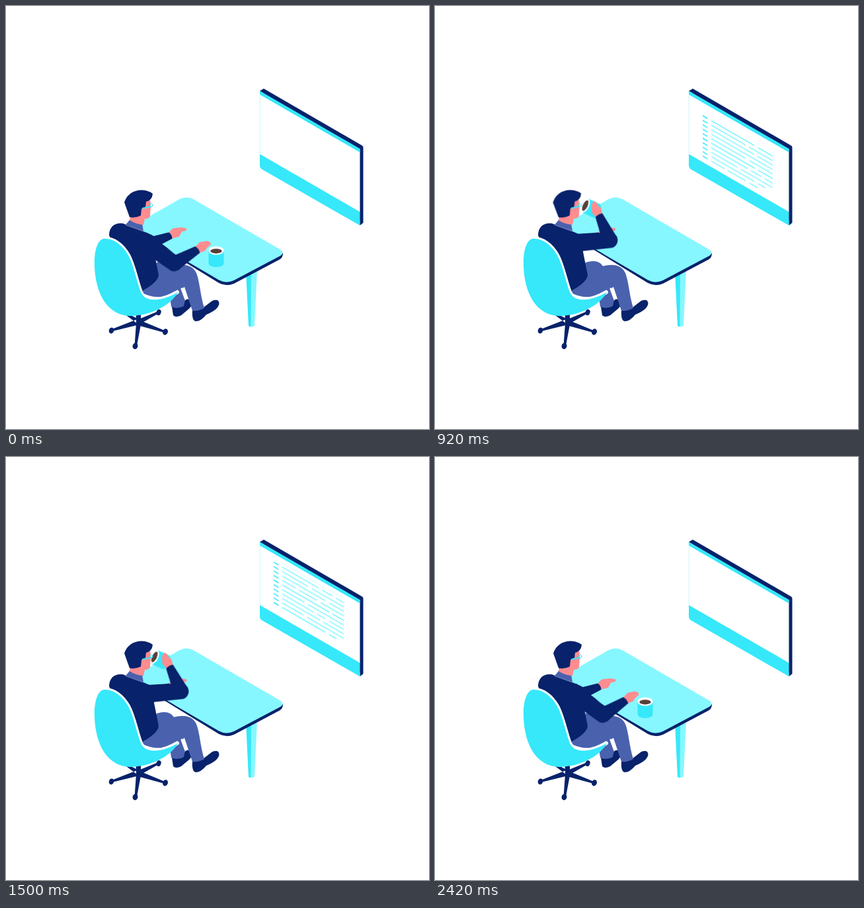
Animation, 640 px wide and 640 px high, one loop 2.71 s. Source, as an HTML page without scripts:

```html
<!DOCTYPE html>
<html lang="en">
<head>
<meta charset="utf-8">
<title>Coffee at the desk</title>
<style>
  html, body { margin: 0; width: 100%; height: 100%; overflow: hidden; background: #fff; }
  svg { display: block; width: 100%; height: 100%; }

  .navy { fill: #08226b; }
  .cyan { fill: #36e8fa; }
  .light { fill: #86f7ff; }
  .blue { fill: #4a62ae; }
  .skin { fill: #ff8c8f; }
  .white { fill: #fff; }
  .coffee { fill: #57403a; }
  .line { fill: none; stroke-linecap: round; stroke-linejoin: round; }

  .rows, .upper, .fore, .grip, .held, .resting, .head { animation: 2710ms linear infinite; }
  .rows { animation-name: scroll; }
  .upper { animation-name: upper; }
  .fore { animation-name: fore; }
  .grip { animation-name: grip; }
  .held { animation-name: held; }
  .resting { animation-name: resting; }
  .head { animation-name: nod; }
  .held, .resting { animation-timing-function: step-end; }

  @keyframes scroll {
    from { transform: translateY(242px); }
    to { transform: translateY(18.4px); }
  }
  @keyframes upper {
    0% { transform: rotate(37deg); animation-timing-function: ease-in-out; }
    12.2% { transform: rotate(25.6deg); animation-timing-function: cubic-bezier(.4, 0, .7, .75); }
    26.2% { transform: rotate(-1deg); animation-timing-function: ease-out; }
    37%, 42% { transform: rotate(-4deg); }
    55.4% { transform: rotate(-3.4deg); animation-timing-function: cubic-bezier(.4, 0, .8, .8); }
    64.6% { transform: rotate(10.7deg); animation-timing-function: cubic-bezier(.2, .3, .6, 1); }
    75.6%, 77% { transform: rotate(25.6deg); animation-timing-function: ease-in-out; }
    89.2%, 100% { transform: rotate(38deg); }
  }
  @keyframes fore {
    0% { transform: rotate(-68deg); animation-timing-function: ease-in-out; }
    12.2% { transform: rotate(-23deg); animation-timing-function: cubic-bezier(.4, 0, .7, .85); }
    26.2% { transform: rotate(-105deg); animation-timing-function: ease-out; }
    37%, 42% { transform: rotate(-111deg); }
    55.4% { transform: rotate(-111.5deg); animation-timing-function: ease-in; }
    64.6% { transform: rotate(-102deg); animation-timing-function: cubic-bezier(.3, .15, .5, 1); }
    75.6%, 77% { transform: rotate(-23deg); animation-timing-function: ease-in-out; }
    89.2%, 100% { transform: rotate(-71deg); }
  }
  @keyframes grip {
    0%, 12.2% { transform: translate(57.6px, -14.1px) rotate(-2.6deg); animation-timing-function: ease-in-out; }
    26.2% { transform: translate(63px, -12px) rotate(48deg); }
    42%, 55.4% { transform: translate(65px, -15px) rotate(50deg); }
    64.6% { transform: translate(63px, -11px) rotate(56deg); animation-timing-function: ease-in-out; }
    75.6%, 100% { transform: translate(57.6px, -14.1px) rotate(-2.6deg); }
  }
  @keyframes held {
    0%, 77% { visibility: hidden; }
    12.2% { visibility: visible; }
  }
  @keyframes resting {
    0%, 77% { visibility: visible; }
    12.2% { visibility: hidden; }
  }
  @keyframes nod {
    0%, 30% { transform: rotate(0); animation-timing-function: ease-in-out; }
    40%, 43% { transform: rotate(-3.5deg); animation-timing-function: ease-in-out; }
    54%, 100% { transform: rotate(0); }
  }
</style>
</head>
<body>
<svg viewBox="0 0 640 640">
  <defs>
    <clipPath id="page">
      <path d="M404 157H412L511 214V275H482L404 230Z"/>
    </clipPath>
    <g id="cup">
      <path class="cyan" d="M-11.5 0V19C-11 27 11 27 11.5 19V0Z"/>
      <ellipse class="white" rx="11.5" ry="6.6"/>
      <ellipse class="coffee" cy=".8" rx="8.7" ry="3.6"/>
    </g>
  </defs>

  <!-- Screen -->
  <path class="navy" d="M384 128.500L390 125L538.500 211Q540.500 212 540.500 214V328L535.500 332L530 220Z"/>
  <path class="white" d="M384 129L535.500 217V312L384 224Z"/>
  <path class="cyan" d="M384 128.500L535.500 216V221.500L384 134Z"/>
  <path class="cyan" d="M384 224L535.500 311.500V332L388 247.500Q384 245 384 241Z"/>
  <path class="line" d="M384.300 134V224" stroke="#b8f7fd" stroke-width=".8"/>
  <g clip-path="url(#page)">
    <g class="rows">
      <g transform="translate(405) skewY(30)" fill="none" stroke-width="1.8">
        <g stroke-dasharray="1.8 5">
          <path d="M3.700-.9v105" stroke="#36e8fa" stroke-width="7.400"/>
          <path d="M59.500-.9v105" stroke="#86f7ff" stroke-width="93"/>
        </g>
        <path stroke="#fff" stroke-width="3" d="M78 0h6M65 6.800h5M78 13.600h5M65 27.200h6M79 34h5
          M68 40.800h5M89 40.800h5M52 47.600h6M78 54.400h6M33 61.200h5M65 61.200h6M84 68h5M46 74.800h6
          M78 81.600h6M60 81.600h6M70 88.400h5M45 95.200h6M78 102h6"/>
      </g>
    </g>
  </g>

  <!-- Chair base -->
  <path class="navy" d="M201 473L160 489L161 492L202 482ZM198 475L230 462L231 465L201 482ZM199 474L240 491L239 494L199 483ZM198 480L182 468L187 467L203 475Z"/>
  <path class="navy" d="M196.500 464H204V482L198 514H194.500L197 480Z"/>
  <g class="navy">
    <ellipse cx="159.500" cy="491" rx="3.700" ry="4.600" transform="rotate(20 159.500 491)"/>
    <ellipse cx="231" cy="463.500" rx="3.500" ry="4.600" transform="rotate(20 231 463.500)"/>
    <ellipse cx="241" cy="493" rx="3.900" ry="4.700" transform="rotate(20 241 493)"/>
    <ellipse cx="195.500" cy="514.500" rx="3.900" ry="4.700" transform="rotate(15 195.500 514.500)"/>
  </g>

  <!-- Legs and shoes -->
  <path class="navy" d="M251 455L269 449Q272 442 277 444L281 446Q283 452 277 458L265 468Q257 472 253 468Z"/>
  <path class="blue" d="M246 425L265 427L271 444L269 454Q260 459 250 455Z"/>
  <path class="navy" d="M282 461L299 456L312 446Q322 442 322.500 450Q322 459 303 467Q295 477 287 477Q281 476 282 461Z"/>
  <path class="blue" d="M203 432L228 388Q247 382 254 393.500Q280 387 288 404C293 416 294 438 300 457Q292 462 282 461L270 425L258 433Q228 448 203 432Z"/>
  <path class="line" d="M266 428L271.500 443" stroke="#fff" stroke-width="3"/>

  <!-- Table -->
  <path class="cyan" d="M363 402H373L371 485Q368 485.500 367 484Z"/>
  <path class="light" d="M371 402L380 398L376 484Q373 485.500 370.500 485Z"/>
  <path class="navy" d="M205 347L322 419Q333 425 345 420L414 383.500Q419 380.500 419 374L333 400Z"/>
  <path class="light" d="M205 325L263 292Q273 287 283 292L414 368Q423 373.500 414 378.500L345 415Q333 420.500 322 414.500L205 346Z"/>

  <!-- Far arm -->
  <path class="skin" d="M245 344L252 336.500L264 335L272 336Q275 338 272 340L266 341.500L262 349L250 352Z"/>
  <path class="navy" d="M208 345L224 348L246 342.500Q251 345 251.500 352L225 366Z"/>

  <!-- Torso -->
  <path class="navy" d="M156 347C156 333 166 327 177 329L208 341L222 347L224 372L231 407Q230 418 206 431L180 400Z"/>
  <path class="blue" d="M181 331L188 322.500L206 329L208 341Z"/>
  <path class="line" d="M181 331.500L208 341" stroke="#8b98c9" stroke-width=".7"/>

  <!-- Chair shell -->
  <path class="line" d="M148 352C162 351 176 361 185 377C194 394 197 415 204 433C211 450 238 446 259 433" stroke="#fff" stroke-width="6"/>
  <path class="cyan" d="M148 352C162 351 176 361 185 377C194 394 197 415 204 433C211 450 238 446 260 433C250 453 218 469 188 469C154 468 136 437 134 395C133 375 137 354 148 352Z"/>

  <!-- Near arm -->
  <use class="resting" href="#cup" x="318" y="370"/>
  <g transform="translate(212 358)">
    <g class="upper">
      <g transform="translate(53)">
        <g class="fore">
          <g class="held"><g class="grip"><use href="#cup"/></g></g>
          <path class="skin" transform="translate(42)" d="M-1-5.500L8-8L18-4Q24 1 20 4L13 5L8 7.500L-1 5.500Z"/>
          <path class="navy" d="M0-11.500L41-6Q44 0 42 6L0 11.500Z"/>
        </g>
      </g>
      <path class="navy" d="M-8-13H30L53-11.500A11.500 11.500 0 0 1 53 11.500L0 14Q-12 12-12 0Z"/>
    </g>
  </g>

  <!-- Head -->
  <g transform="translate(200 325)">
    <g class="head">
      <g transform="translate(-200 -325)">
        <path class="skin" d="M188 319L205 305L212 293L218 291L219 301L218 318Q216 322 210 322L208 331Q196 330 187 324Z"/>
        <path class="navy" d="M179 297C183 284 195 278 206 278.500Q216 279 222 284Q221 294 212 296L211 304L205 307L204 317Q197 321 187 319.500Z"/>
        <path class="skin" d="M205 307Q210 304 211 309Q210 314 205 314Z"/>
        <path class="line" d="M207 306L219 303.500" stroke="#36e8fa" stroke-width="2"/>
        <ellipse class="line" cx="219.700" cy="301.800" rx="2.200" ry="2.600" stroke="#36e8fa" stroke-width="1"/>
      </g>
    </g>
  </g>
</svg>
</body>
</html>
```
